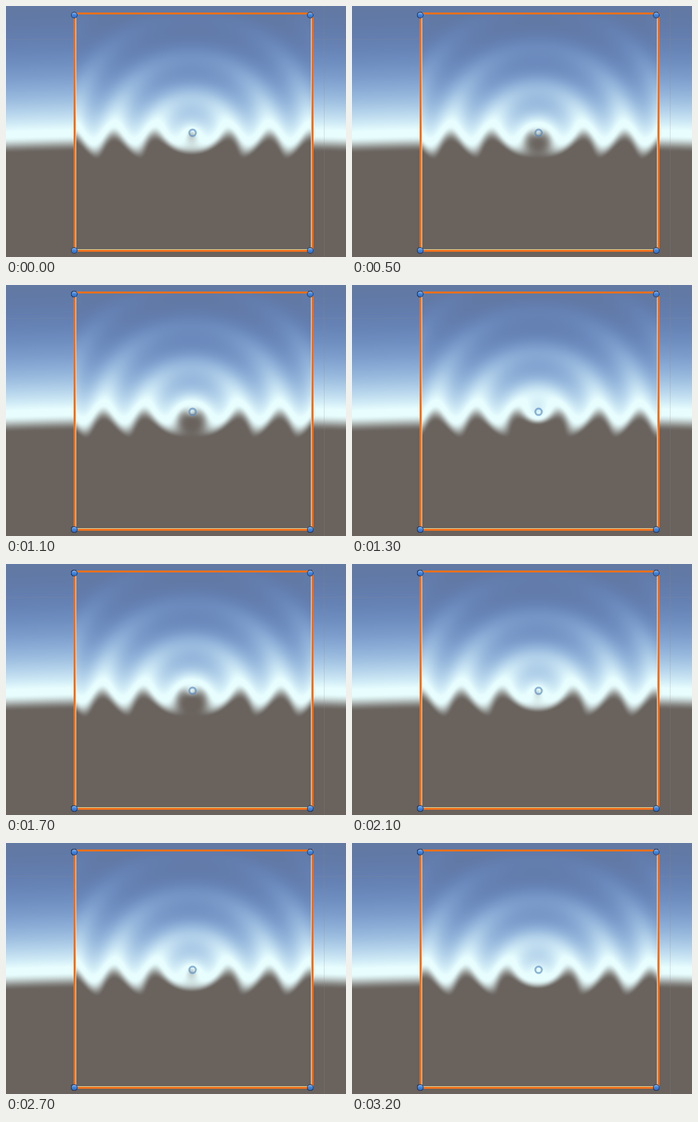
Animation, 523 px wide and 386 px high, one loop 3.3 s. Source, as an HTML page with a canvas:

```html
<!DOCTYPE html>
<html lang="en">
<head>
<meta charset="utf-8">
<title>Ripple distortion</title>
<style>
html, body { margin: 0; width: 100%; height: 100%; overflow: hidden; background: #69625d; }
canvas { display: block; width: 523px; height: 386px; }
</style>
</head>
<body>
<canvas id="stage" width="523" height="386"></canvas>
<script>
const W = 523, H = 386, LOOP = 3300;
const BOX = { x: 107, y: 13, w: 363, h: 362 };
const CX = 285.2, CY = 195, WAVE = 63, AMP = 13.3;
const ZENITH = [97, 121, 163], HAZE = [231, 253, 254], GROUND = [105, 98, 93];
const CURVE = [2.76, 2.25, 1.4]; // how late each channel brightens towards the haze
const ctx = document.getElementById('stage').getContext('2d');

const clamp = v => Math.min(1, Math.max(0, v));
const mix = (a, b, u) => a + (b - a) * u;
const smooth = u => u * u * (3 - 2 * u);

function skyColor(y) {
  const rise = clamp(y / 188), fall = smooth(clamp((y - 196) / 26));
  return CURVE.map((p, c) => mix(mix(ZENITH[c], HAZE[c], rise ** p), GROUND[c], fall));
}

const FINE = 8;
const lut = Array.from({ length: H * FINE + 1 }, (_, i) => skyColor(i / FINE));

// Paint an area of sky; shift(x, y) moves the sampled height
function paintSky(x0, y0, w, h, shift) {
  const img = ctx.createImageData(w, h);
  let p = 0;
  for (let y = y0; y < y0 + h; y++) {
    for (let x = x0; x < x0 + w; x++) {
      const sag = 5 * ((x - CX) / CX) ** 2;
      const s = clamp((y - sag + shift(x, y)) / H);
      for (const v of lut[Math.round(s * H * FINE)]) img.data[p++] = v;
      img.data[p++] = 255;
    }
  }
  ctx.putImageData(img, x0, y0);
}

function bar(color, x, y, w, h) {
  ctx.fillStyle = color;
  ctx.fillRect(x, y, w, h);
}

function disc(x, y, r, fill) {
  ctx.fillStyle = fill;
  ctx.beginPath();
  ctx.arc(x, y, r, 0, 7);
  ctx.fill();
}

function handle(x, y) {
  const g = ctx.createLinearGradient(0, y - 4, 0, y + 4);
  g.addColorStop(0, '#7fb4f2');
  g.addColorStop(0.5, '#3f83dc');
  g.addColorStop(1, '#2f70cc');
  disc(x, y, 5, '#26375a');
  disc(x, y, 4, g);
}

function drawFrame() {
  ctx.strokeStyle = '#f0701c';
  ctx.lineWidth = 3;
  ctx.strokeRect(105.5, 11.5, 366, 365);
  bar('#f3dcb4', 107, 13, 1, 361);
  bar('#f3dcb4', 469, 13, 1, 361);
  bar('#d8d7a0', 107, 374, 363, 1);
  for (const x of [105, 468]) for (const y of [14, 376]) handle(x, y);
}

function drawPivot() {
  ctx.strokeStyle = 'rgba(78, 132, 190, 0.6)';
  ctx.lineWidth = 3;
  ctx.beginPath();
  ctx.arc(287, 195, 5, 0, 7);
  ctx.stroke();
}

function draw(step) {
  const trough = Math.max(25.3, 17.8 + 10.8 * step);
  paintSky(BOX.x, BOX.y, BOX.w, BOX.h, (x, y) =>
    -AMP * Math.cos((Math.hypot(x - CX, y - CY) - trough) * 2 * Math.PI / WAVE));
  drawFrame();
  drawPivot();
}

paintSky(0, 0, W, H, () => 0);
const GRID = 'rgba(135, 138, 145, 0.25)';
bar(GRID, 489, 0, 1, H);
bar(GRID, 0, 51, W, 1);

// The first step holds for 400 ms, the rest for 100 ms each
let shown = -1;
function tick() {
  const step = Math.max(0, Math.floor(performance.now() % LOOP / 100) - 3);
  if (step !== shown) draw(shown = step);
  requestAnimationFrame(tick);
}
tick();
</script>
</body>
</html>
```
